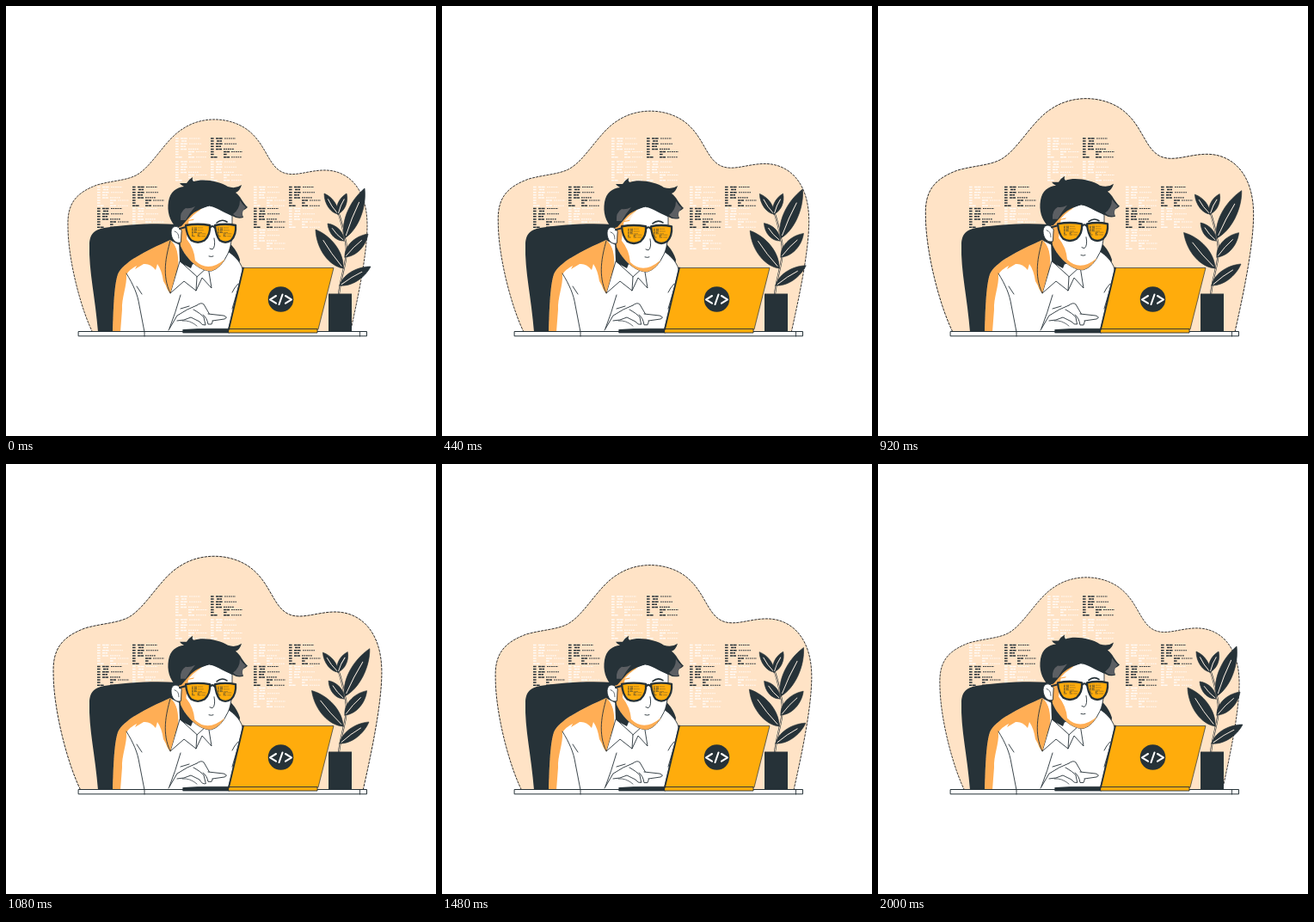
An HTML page with a canvas for the animation above (2040 ms loop, 500x500 px).

```html
<!DOCTYPE html>
<html lang="en">
<head>
<meta charset="utf-8">
<title>Coder at a desk</title>
<style>
html, body { margin: 0; width: 100%; height: 100%; overflow: hidden; background: #fff; }
canvas { display: block; width: 500px; height: 500px; }
</style>
</head>
<body>
<canvas id="stage"></canvas>
<script>
const LOOP = 2040, STEP = 40;
const INK = '#263238', GOLD = '#ffac0c', SHADE = '#ffae55', PEACH = '#ffe3c6', WHITE = '#fff', GREY = '#5c5f63';

const canvas = document.getElementById('stage');
const ctx = canvas.getContext('2d');
const ratio = window.devicePixelRatio || 1;
canvas.width = canvas.height = 500 * ratio;
ctx.scale(ratio, ratio);
ctx.lineJoin = ctx.lineCap = 'round';

function draw(d, fill, stroke, width = 0.9) {
  const p = typeof d === 'string' ? new Path2D(d) : d;
  if (fill) { ctx.fillStyle = fill; ctx.fill(p); }
  if (stroke) { ctx.strokeStyle = stroke; ctx.lineWidth = width; ctx.stroke(p); }
}

function box(x, y, w, h, color) {
  ctx.fillStyle = color;
  ctx.fillRect(x, y, w, h);
}

// ---- backdrop ----
const blob = new Path2D(`M102.5 383 C88 356 72 296 72 256 C71 229 82 217 106 208
  C124 203 139 203 151 197 C170 187 185 155 206 142.5 C227 128.5 257 128.5 278 142
  C299 156 303 178 315 189 C330 203 350 190 373 191 C397 192 420 211 420 255
  C420 290 408 345 399.5 383 Z`);

function backdrop(k) {
  const s = 1 + 0.098 * k;
  ctx.save();
  ctx.beginPath();
  ctx.rect(0, 0, 500, 380);
  ctx.clip();
  ctx.translate(246, 386);
  ctx.scale(s, s);
  ctx.translate(-246, -386);
  draw(blob, PEACH);
  ctx.lineCap = 'butt';
  ctx.setLineDash([3, 1]);
  draw(blob, null, '#111', 0.8);
  ctx.restore();
}

// ---- code listings: each row is a list of start/end pairs ----
const rows = [
  [0, 4, 6, 14, 16, 29],
  [0, 4, 7, 13],
  [0, 4, 6, 14, 16, 30],
  [0, 4, 6, 12],
  [0, 4, 6, 13, 15, 27],
  [0, 4, 15, 22, 24, 37],
  [0, 4, 15, 19],
  [0, 8, 15, 22, 24, 36]
];

function listing(x, y, color, scale = 1) {
  ctx.save();
  ctx.translate(x, y);
  ctx.scale(scale, scale);
  ctx.strokeStyle = color;
  ctx.lineCap = 'butt';
  rows.forEach((row, r) => {
    for (let i = 0; i < row.length; i += 2) {
      const dotted = i === 4;
      ctx.setLineDash(dotted ? [1.7, 0.8] : [3.5, 0.4]);
      ctx.lineWidth = dotted ? 1.1 : 1.5;
      ctx.beginPath();
      ctx.moveTo(row[i], 1 + r * 3.1);
      ctx.lineTo(row[i + 1], 1 + r * 3.1);
      ctx.stroke();
    }
  });
  ctx.restore();
}

function listings() {
  const pale = '#fffaf5';
  listing(197, 153, pale);
  listing(238, 153, INK);
  listing(197, 180, pale);
  listing(238, 180, pale);
  for (const x of [106, 288]) {
    listing(x, 209.5, pale);
    listing(x + 41, 209.5, INK);
    listing(x, 234.5, INK);
    listing(x + 41, 234.5, pale);
  }
  listing(288, 259.5, pale);
}

// ---- plant: base, tip, half-width, sway in degrees ----
const leaves = [
  [386, 242, 370, 218, 4.8, -4],
  [386, 242, 396, 218, 4.8, 3],
  [393, 273, 374, 253, 5.5, 3],
  [394, 270, 417, 212, 8.5, 6],
  [394, 292, 421, 265, 7, -3],
  [392, 305, 360, 260, 9, -6],
  [388, 325, 424, 303, 6.5, -5]
];

function leaf([x, y, tx, ty, w, turn], k) {
  const len = Math.hypot(tx - x, ty - y);
  ctx.save();
  ctx.translate(x, y);
  ctx.rotate(Math.atan2(ty - y, tx - x) + turn * k * Math.PI / 180);
  draw(`M0 0 C${len * 0.2} ${-w * 1.3} ${len * 0.65} ${-w * 1.4} ${len} 0
    C${len * 0.7} ${w * 1.2} ${len * 0.25} ${w * 1.3} 0 0Z`, INK, INK, 0.6);
  draw(`M${len * 0.06} 0 Q${len * 0.4} -1.5 ${len * 0.72} 0`, null, '#fff3e6', 0.9);
  ctx.restore();
}

function plant(k) {
  const stem = 'M387 335 C390 309 400 291 394 270 Q391 253 386 239';
  draw(stem, null, INK, 2.1);
  draw(stem, null, PEACH, 0.9);
  leaves.forEach(l => leaf(l, k));
  box(375, 334.5, 27, 45, INK);
}

// ---- person ----
function body() {
  draw('M107 379 C104 340 96 307 97 278 C97 264 104 260 114 258 C140 254 172 252 199 254 C238 257 265 271 272 295 L260 379Z', INK);
  draw('M124 379 C125 347 126 324 130 312 C136 298 162 285 191 272 L203 278 L217 300 L256 284 C266 290 275 299 276 311 L259 379Z', WHITE, INK);
  draw('M124 379 C125 347 126 324 130 312 C136 298 162 285 191 272 C203 282 204 308 191 334 L183 320 Q181 307 176 300 L174 307 Q168 299 160 300 L150 306 L152 302 Q144 306 140 312 C141 325 134 340 135 353 L133 379Z', SHADE);
  draw('M140 311 C148 324 153 335 155 348 L161 379 M152 326 L158 335 M276 311 Q269 330 263 352 M270 323 Q265 328 263 333 M203 336 Q197 357 190 375', null, INK);
  draw('M201 272 L217 300 L215 305 L202 298Z', INK);
  draw('M202 297 L191 334 L207 320 L221 331 L222 315Z', WHITE, INK);
  draw('M191 273 C201 280 203 296 191 334 C184 327 184 318 190 302 C193 291 188 282 191 273Z', SHADE);
  draw('M222 315 L235 303 L239 328 L228 316 L221 331 M191 273 C186 291 181 313 191 334', null, INK);
}

function hair() {
  draw(`M198 258 C190 249 187 239 189 227 C191 216 198 211 207 210 Q203 208 202 206
    L210 206 Q212 202 217 199 Q216 202 218 204 C230 200 249 204 258 210
    Q267 213 274 208 Q272 215 267 217 C273 221 275 229 281 234 Q277 238 273 238
    Q275 242 276 246 Q269 248 263 244 C249 239 241 230 232 234
    Q218 238 211 248 L204 256Z`, INK);
  draw('M203 249 Q202 239 209 235 Q214 236 220 233 Q214 240 209 249Z', GREY);
  draw('M264 242 Q272 236 272 226 Q275 231 279 234 Q274 238 275 245 Q269 247 264 242Z', GREY);
}

function lens(x, w, offset) {
  const d = `M${x} 255 Q${x + w / 2} 252.5 ${x + w} 255 Q${x + w + 1} 266 ${x + w * 0.78} 272.5
    Q${x + w * 0.5} 277 ${x + w * 0.23} 272.5 Q${x + 1} 267 ${x} 255Z`;
  draw(d, GOLD);
  ctx.save();
  ctx.clip(new Path2D(d));
  listing(x + offset, 257.5, INK, 0.45);
  ctx.restore();
  draw(d, null, INK, 2.3);
}

function head(wave) {
  // light from the screen on the cheek and fringe
  const glow = Math.max(0, Math.min(1, (0.9 - wave) / 0.6));
  const face = 'M200 249 L210 234 L240 229 L263 244 C263 262 263 278 258 288 Q250 305 239 308 C226 309 210 295 203 279Z';
  ctx.save();
  ctx.translate(0, wave * 2.2);
  draw(face, WHITE, INK);

  ctx.save();
  ctx.clip(new Path2D(face));
  draw('M207 251 Q211 240 230 233 Q222 240 218 249Z', SHADE);
  ctx.translate(-6 * (1 - glow), 4 * (1 - glow));
  draw('M202 245 L213 246 L210 271 Q219 282 220 296 Q235 311 255 294 L250 312 L225 316 L200 296Z', SHADE);
  ctx.restore();

  hair();
  ctx.globalAlpha = glow;
  draw('M212 249 Q222 237 238 232 Q229 237 222 247Z', WHITE);
  ctx.globalAlpha = 1;
  draw('M204 261 C200 254 192 255 192 263 C192 271 197 277 203 275Z', WHITE, INK);
  draw('M196 262 Q201 263 201 270', null, INK, 0.7);
  draw('M245 252 Q251 247 257 251', null, INK, 1.6);
  draw('M242 270 Q244 280 240 283 L237 282 M236 291 Q239 292 241 291', null, INK);

  ctx.translate(0, wave * 0.8);
  lens(209, 28, 7);
  lens(243, 24, 3);
  draw('M237 258 Q240 254 243 258 M209 257 L202 259', null, INK, 2.2);
  ctx.restore();
}

function hand(tap) {
  draw('M190 378 L200 359 Q212 350 222 348 L228 346 Q236 353 239 358 L254 360 Q259 362 255 364 L242 366 L238 374 L207 376Z', WHITE);
  draw('M189 377 L199 360 Q211 352 222 348 M203 352 L213 349', null, INK);
  draw(`M218 353 Q227 358 230 362 L${232 + tap * 0.5} ${371 + tap} Q228 ${372 + tap} 225 367 L215 362 Q207 366 199 366`, WHITE, INK);
  draw(`M222 348 Q227 344 230 347 L237 359 Q243 362 239 ${370 - tap} L235 ${370 - tap} Q234 363 229 359`, WHITE, INK);
  draw('M235 358 L253 360 Q259 362 254 364 L240 366', WHITE, INK);
  draw('M205 366 Q214 365 222 372', null, INK, 0.7);
}

// ---- furniture ----
function desk() {
  draw('M84.5 378.5 H419.5 V383.8 H84.5Z', WHITE, INK, 1);
  draw('M161 379 V384 M411.5 379 V384', null, INK, 0.9);
}

function laptop() {
  draw('M206 375.3 H260 V380 H206Z', INK, INK, 0.7);
  draw('M276 304.5 L381 304.5 L363 376 H259Z', GOLD, INK, 0.7);
  draw('M259 375.5 H362 V380 H259Z', GOLD, INK, 0.9);
  draw('M276 304.5 L259 376', null, INK, 1.8);
  ctx.beginPath();
  ctx.arc(319.5, 341, 14.8, 0, 7);
  ctx.fillStyle = INK;
  ctx.fill();
  draw('M314 337 L307 341.3 L314 345.6 M325 337 L332 341.3 L325 345.6 M321.5 335.5 L317.5 347', null, WHITE, 2.1);
}

function render(now) {
  const t = Math.floor((now % LOOP) / STEP) * STEP;
  const a = t / LOOP * Math.PI * 2;
  const k = (1 - Math.cos(a)) / 2;
  box(0, 0, 500, 500, WHITE);
  backdrop(k);
  listings();
  plant(k);
  body();
  head(Math.sin(2 * a));
  desk();
  laptop();
  hand(Math.sin(4 * a));
}

const start = performance.now();
function tick() {
  render(performance.now() - start);
  requestAnimationFrame(tick);
}
tick();
</script>
</body>
</html>
```
